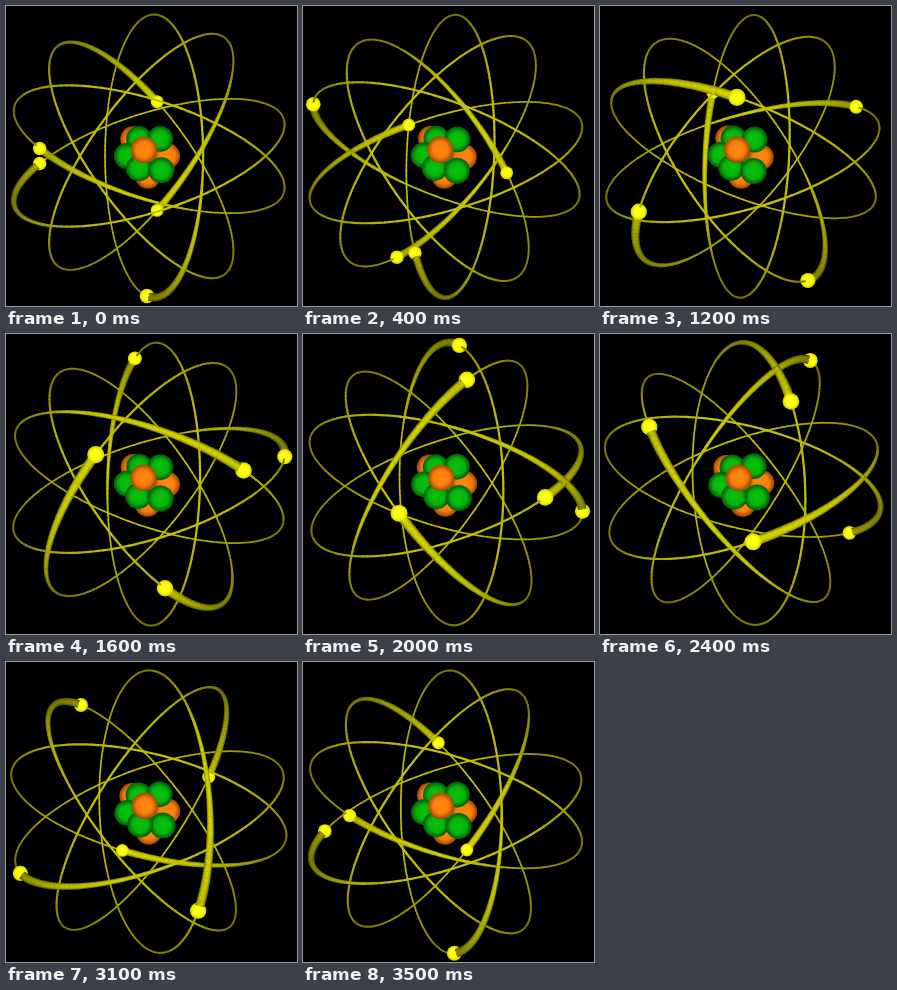
Write an HTML page with a canvas that moves like this. It is 291 px wide and 300 px high and loops after 3600 ms.

```html
<!DOCTYPE html>
<html lang="en">
<head>
<meta charset="utf-8">
<title>Atom</title>
<style>
  html, body { margin: 0; width: 100%; height: 100%; overflow: hidden; background: #000; }
  canvas { display: block; width: 291px; height: 300px; }
</style>
</head>
<body>
<canvas id="stage"></canvas>
<script>
const W = 291, H = 300;
const CENTER = { x: 141, y: 150 };
const RADIUS = 140;
const CAMERA = 6.5 * RADIUS;
const LOOP = 3600, STEP = 100;
const RAD = Math.PI / 180;
const SWAY = 3.5 * RAD;
const OPENING = 0.343;                       // sine of the angle between orbit plane and view
const DEPTH = Math.sqrt(1 - OPENING ** 2);
const SEGMENT = 2.5, TRAIL = 85;             // degrees
const LINE_WIDTH = 1.9, TRAIL_WIDTH = 8.6, ELECTRON_SIZE = 7.3, NUCLEON_SIZE = 12.8;

const ORANGE = ['#ff8a12', '#fb7e0c', '#9c4804'];
const GREEN = ['#08c40c', '#06b40c', '#035808'];
const YELLOW = ['#ffff30', '#ffff00', '#d2d200'];

const NUCLEONS = [
  [-3, -6, 24, ORANGE], [13, -17, 9, GREEN], [-20, 0, 8, GREEN],
  [-8, 12, 17, GREEN], [14, 14, 18, GREEN], [20, 0, 6, ORANGE],
  [-8, -17, 7, GREEN], [-14, -17, -2, ORANGE], [1, 20, -2, ORANGE],
  [4, -2, 0, GREEN]
];

const canvas = document.getElementById('stage');
const ratio = window.devicePixelRatio || 1;
canvas.width = W * ratio;
canvas.height = H * ratio;
const ctx = canvas.getContext('2d');
ctx.scale(ratio, ratio);

// Sways a point about the vertical axis, then about the line of sight.
function swayed([x, y, z], sway) {
  const cos = Math.cos(SWAY * sway), sin = Math.sin(SWAY * sway);
  const sx = x * cos - z * sin;
  return [sx * cos - y * sin, sx * sin + y * cos, z * cos + x * sin];
}

function project(point, sway) {
  const [x, y, z] = swayed(point, sway);
  const scale = CAMERA / (CAMERA - z);
  return { x: CENTER.x + x * scale, y: CENTER.y + y * scale, z, scale };
}

function orbitPoint(turn, phase) {
  const t = turn * RAD, p = phase * RAD;
  const near = RADIUS * OPENING * Math.cos(p), along = RADIUS * Math.sin(p);
  return [
    near * Math.cos(t) - along * Math.sin(t),
    near * Math.sin(t) + along * Math.cos(t),
    RADIUS * DEPTH * Math.cos(p)
  ];
}

function drawSphere(p, radius, [light, base, edge]) {
  const r = radius * p.scale;
  const fill = ctx.createRadialGradient(p.x, p.y, 0, p.x, p.y, r);
  fill.addColorStop(0, light);
  fill.addColorStop(0.6, base);
  fill.addColorStop(1, edge);
  ctx.fillStyle = fill;
  ctx.beginPath();
  ctx.arc(p.x, p.y, r, 0, 2 * Math.PI);
  ctx.fill();
}

function strokeLine(a, b, width, level) {
  const v = Math.round(level);
  ctx.strokeStyle = `rgb(${v},${v},0)`;
  ctx.lineWidth = width;
  const length = Math.hypot(b.x - a.x, b.y - a.y) || 1;
  const ex = (b.x - a.x) / length * 0.4, ey = (b.y - a.y) / length * 0.4;
  ctx.beginPath();
  ctx.moveTo(a.x - ex, a.y - ey);
  ctx.lineTo(b.x + ex, b.y + ey);
  ctx.stroke();
}

function drawTube(a, b, thickness) {
  const dx = b.x - a.x, dy = b.y - a.y, dz = b.z - a.z;
  const facing = Math.hypot(dx, dy) / Math.hypot(dx, dy, dz);
  const level = 85 + 125 * facing;
  const width = thickness * (a.scale + b.scale) / 2;
  if (width < 3) {
    strokeLine(a, b, width, level * 0.92);
    return;
  }
  strokeLine(a, b, width, level * 0.62);
  strokeLine(a, b, width * 0.75, level * 0.88);
  strokeLine(a, b, width * 0.45, level);
}

function render(time) {
  const turnDegrees = time / LOOP * 360;
  const sway = Math.sin(turnDegrees * RAD);
  const items = [];

  for (const [x, y, z, colors] of NUCLEONS) {
    const p = project([x, y, z], sway);
    items.push({ z: p.z, draw: () => drawSphere(p, NUCLEON_SIZE, colors) });
  }

  for (let i = 0; i < 5; i++) {
    const turn = 72 * i, head = 90 + 36 * i + turnDegrees;
    const electron = project(orbitPoint(turn, head), sway);
    items.push({ z: electron.z + 4, draw: () => drawSphere(electron, ELECTRON_SIZE, YELLOW) });

    let a = electron;
    for (let back = SEGMENT; back <= 360; back += SEGMENT) {
      const from = a, to = project(orbitPoint(turn, head - back), sway);
      const fade = Math.max(0, 1 - back / TRAIL);
      const thickness = LINE_WIDTH + (TRAIL_WIDTH - LINE_WIDTH) * fade;
      items.push({ z: (from.z + to.z) / 2, draw: () => drawTube(from, to, thickness) });
      a = to;
    }
  }

  ctx.fillStyle = '#000';
  ctx.fillRect(0, 0, W, H);
  items.sort((p, q) => p.z - q.z).forEach(item => item.draw());
}

const start = performance.now();
function tick() {
  const elapsed = (performance.now() - start) % LOOP;
  render(Math.floor(elapsed / STEP) * STEP);
  requestAnimationFrame(tick);
}
tick();
</script>
</body>
</html>
```
